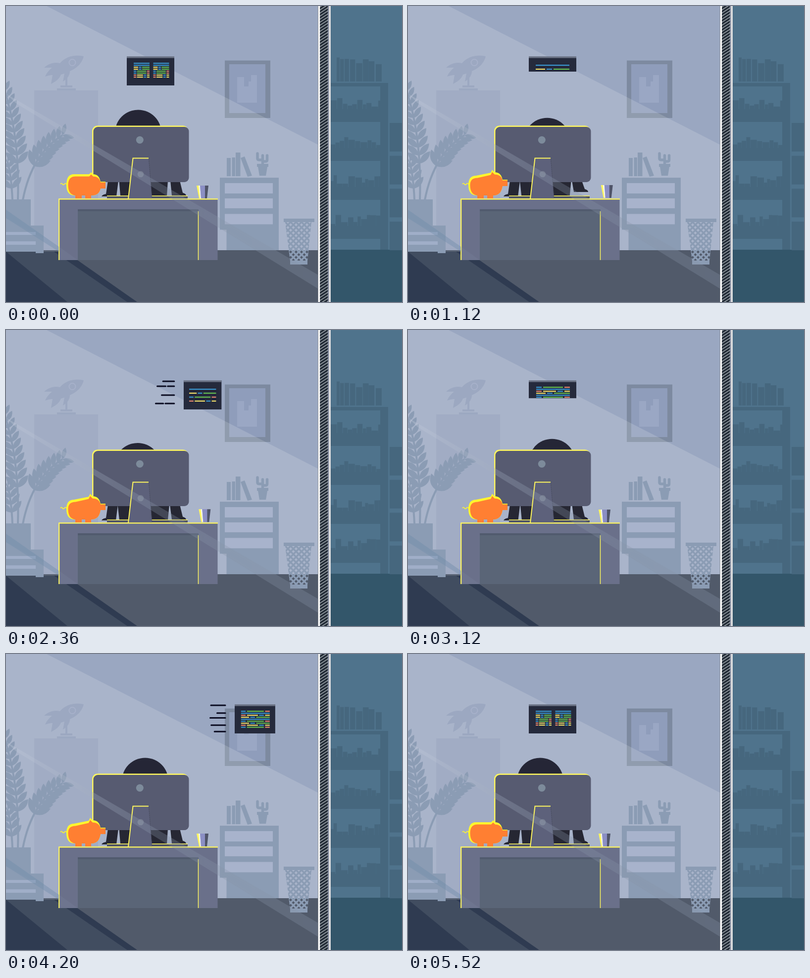
These frames come from a looping animation (800 px wide and 600 px high, 5560 ms). An HTML page:

```html
<!DOCTYPE html>
<html lang="en">
<head>
<meta charset="utf-8">
<title>Office loop</title>
<style>
html, body { margin: 0; width: 100%; height: 100%; overflow: hidden; }
svg { display: block; width: 100vw; height: 100vh; }
</style>
</head>
<body>
<svg viewBox="0 0 800 600">
<defs>
  <pattern id="rope" width="6.2" height="6.2" patternUnits="userSpaceOnUse" patternTransform="translate(634 0) skewY(-33)">
    <path d="M0 2H7" stroke="#b3bbc0" stroke-width="1.6"/>
  </pattern>
  <pattern id="mesh" width="11" height="11" patternUnits="userSpaceOnUse" x="564" y="438">
    <path d="M-2 -2L13 13M13 -2L-2 13" stroke="#8b9cb4" stroke-width="3.6"/>
  </pattern>
  <linearGradient id="ray">
    <stop stop-color="#c6cede"/><stop offset=".5" stop-color="#8693a7"/>
  </linearGradient>
  <clipPath id="reveal"><rect id="revealBox" y="102" width="96" height="59"/></clipPath>
</defs>

<!-- left room: wall, picture, daylight -->
<path fill="#9aa7c1" d="M0 0H632V600H0z"/>
<path fill="#7d8aa0" d="M442 110.500h92v116.500h-92z"/>
<path fill="#8f9dbb" d="M451 118h73v99h-73z"/>
<path fill="#9aa7c4" d="M467 144h14v19h9v-10h5v-13h12v56h-40z"/>
<path fill="#fff" opacity=".15" d="M0 0H82L632 282V600H0z"/>

<!-- cabinet and rocket -->
<path fill="#a1acc4" d="M57 171h129v324H57z"/>
<g fill="#9ca8c1">
  <path d="M103 167h38v4h-38zM110 161h24v4h-24zM120 136h4v25h-4z"/>
  <path d="M157 102C139 98 121 102 109 116C97 113 86 117 77 125L93 125C86 131 82 136 79 143C85 141 89 140 94 140L91 158C101 153 108 147 111 139L118 137L115 153C124 148 129 140 129 132C144 126 154 115 157 102z"/>
</g>
<circle cx="134" cy="114.500" r="6.500" fill="none" stroke="#a7b1ca" stroke-width="2"/>

<!-- floor -->
<path fill="#515a6a" d="M0 495H632V600H0z"/>
<path fill="#2f3b51" d="M0 498H120L265 600H0z"/>
<path fill="#414d60" d="M0 498H97L245 600H124z"/>

<!-- plant and low shelf -->
<g id="plant" fill="#8b9cb4" stroke="#8b9cb4"></g>
<path fill="#8b9cb4" d="M0 392h50v53h26v56H60v-3H0z"/>
<path fill="#a3b0ca" d="M0 458h60v6H0zM0 477h60v7H0z"/>

<!-- drawers, books, cactus, bin -->
<g fill="#8b9cb4">
  <path d="M432 348h119v147H445.500v-41.500H432z"/>
  <path d="M446 308h8v37h-8zM456.500 307h6.500v38h-6.500zM464 297h9.500v48H464zM474 308l8-3L497 344l-9 2z"/>
  <path d="M507 320h23v6h-2l-3 18h-13l-3-18h-2z"/>
  <path fill="none" stroke="#8b9cb4" stroke-width="5.500" stroke-linecap="round" d="M518.500 303V322M508 299V309Q508 312 512 312H517M527.500 303V312Q527.500 315 524 315H519"/>
  <path d="M561 431h62v7h-62zM574 516h35v8h-35z"/>
</g>
<path fill="#a8b3cc" d="M442 359h97v21h-97zM442 390h97v20h-97zM442 421.500h97v21h-97z"/>
<path fill="url(#mesh)" d="M564 438H617L609 517H574z"/>

<!-- person -->
<circle id="head" r="47" fill="#252636"/>
<path id="body" fill="#262733"/>

<!-- keyboard and monitor -->
<path fill="#4f5468" d="M204 385h163v5H204z"/>
<path stroke="#fff75e" stroke-width="1.500" d="M204 385H367"/>
<rect x="174" y="242.500" width="194" height="113" rx="11" fill="#fff75e"/>
<rect x="176.500" y="245" width="193" height="112" rx="9" fill="#575b71"/>
<circle cx="270.300" cy="271.500" r="7.500" fill="#7d8b9b"/>
<path fill="#5d617b" d="M256 308.500H288L295 391H247z"/>
<path fill="none" stroke="#fff75e" stroke-width="2" d="M247 391L256.500 308.500H288"/>
<path stroke="#4a4e62" stroke-dasharray="3 1" d="M288.500 310L295 389"/>
<circle cx="272" cy="341" r="6.300" fill="#787f92"/>

<!-- desk -->
<path fill="#6a708a" d="M107 391H427.500V515H107z"/>
<path fill="#5a6577" d="M145 413H389V515H145z"/>
<path fill="#515b6e" d="M145 412H389V416H145z"/>
<path fill="none" stroke="#fff75e" stroke-width="2.200" d="M107.200 515V391.300H428"/>
<path stroke="#fff75e" stroke-width="1.500" d="M388.500 416V515"/>

<g id="cup">
  <path fill="#fff75e" d="M385 364h5l3 26h-3z"/>
  <path fill="#f4f5ee" d="M389 364h3l2 26h-2z"/>
  <path fill="#8b8fc4" d="M392 364h10v26h-8z"/>
  <path fill="#4f5468" d="M402 364h7l-3 26h-4z"/>
</g>

<!-- piggy bank -->
<path fill="none" stroke="#fff52e" stroke-width="1.600" d="M110 361q2-3 4 0t4 0t4 0h3"/>
<path id="pigRim" fill="#fff52e"/>
<path id="pig" fill="#ff7f32"/>
<path fill="#ff7f32" d="M140 378h13v12h-13zM160 378h12v12h-12z"/>

<!-- light beams -->
<path fill="url(#ray)" opacity=".3" d="M0 178L632 546V574L20 197z"/>
<path fill="#6d8aa8" opacity=".4" d="M0 413L107 488V498L0 430z"/>
<path fill="#8b9cb4" opacity=".12" d="M0 430L107 488L145 515H107V498H0z"/>

<!-- right room -->
<path fill="#4f738c" d="M655 0H800V495H655z"/>
<path fill="#33566a" d="M655 494H800V600H655z"/>
<g id="library" fill="#46677e"></g>

<g id="speed" stroke="#0a0b20" stroke-width="3" stroke-linecap="round"></g>
<g id="panel">
  <g clip-path="url(#reveal)">
    <path fill="#252a3c" d="M0 102H96V161H0z"/>
    <g id="code0"></g><g id="code1"></g><g id="code2"></g>
  </g>
  <path fill="#6d7587" d="M0 102H96V105.500H0z"/>
</g>

<!-- divider -->
<path fill="#222b36" d="M630 0H656V600H630z"/>
<path fill="url(#rope)" d="M634 0H652V600H634z"/>
<path fill="#fff" d="M630.500 0h3.700V600h-3.700zM652.700 0h3V600h-3z"/>
<path fill="#b9bfd6" d="M650.500 0h1.500V600h-1.500z"/>
</svg>

<script>
const LOOP = 5560, STEP = 40, HOME = 244;
const SLIDES = [360, 2280, 4080, Infinity];
const $ = id => document.getElementById(id);
const add = (id, markup) => $(id).insertAdjacentHTML('beforeend', markup);
const show = (id, on) => $(id).style.display = on ? '' : 'none';
const rect = (x, y, w, h, fill = '') =>
  `<rect x="${x}" y="${y}" width="${w}" height="${h}" ${fill && `fill="${fill}"`}/>`;
const clamp = u => Math.min(1, Math.max(0, u));
const ramp = (t, from, to) => clamp((t - from) / (to - from));
const ease = (t, from, to) => { const u = ramp(t, from, to); return u * u * (3 - 2 * u); };

let seed = 7;
const random = (lo, hi) => {
  seed = seed * 16807 % 2147483647;
  return lo + (hi - lo) * seed / 2147483647;
};

// A frond: a curved stem with leaf pairs that shrink toward the tip
function frond(x0, y0, cx, cy, x1, y1, pairs, from, size) {
  let out = `<path d="M${x0} ${y0}Q${cx} ${cy} ${x1} ${y1}" fill="none" stroke-width="4"/>`;
  for (let i = 0; i <= pairs; i++) {
    const u = from + (1 - from) * i / pairs, v = 1 - u;
    const x = v * v * x0 + 2 * u * v * cx + u * u * x1;
    const y = v * v * y0 + 2 * u * v * cy + u * u * y1;
    const dir = Math.atan2(v * (cy - y0) + u * (y1 - cy), v * (cx - x0) + u * (x1 - cx)) * 180 / Math.PI;
    const len = size * (1 - .3 * i / pairs), w = len * .38;
    for (const side of [-44, 44])
      out += `<path stroke="none" transform="translate(${x} ${y})rotate(${dir + side})" d="M0 0Q${len / 2} ${-w} ${len} 0Q${len / 2} ${w} 0 0"/>`;
  }
  return out;
}
add('plant', frond(24, 393, 28, 265, -3, 172, 10, .3, 33)
  + frond(34, 393, 52, 300, 114, 262, 7, .42, 35)
  + frond(13, 393, 11, 345, 3, 315, 4, .25, 31));

// Bookcases: a run of random books standing on each shelf
function books(x, end, base, low, high, gap) {
  let out = '';
  while (x < end - 4) {
    const w = Math.min(random(6, 14), end - x), h = random(low, high);
    out += rect(x, base - h, w, h);
    x += w + random(0, gap);
  }
  return out;
}
add('library', books(668, 759, 153, 33, 50, 3) + rect(655, 156, 117, 7) + rect(756, 156, 16, 338));
for (let i = 0; i < 4; i++) {
  const floor = 209 + i * 79;
  add('library', rect(655, floor, 102, 26) + books(655, 757, floor, 4, 24, 1)
    + rect(775, 237 + i * 66.7, 25, 58));
}

// Code lines: ink letter and width of each run, on a 68 px line
const INK = { b: '#3a9ad4', y: '#fbe66c', g: '#68c452', o: '#f08a72' };
const LINE = { b: 'b68', m: 'y19 b11 g32', n: 'b11 g40 o11', p: 'o11 y26 b11 y11' };
function code(id, rows, pitch, starts, scale) {
  for (const start of starts) [...rows].forEach((row, i) => {
    let x = start;
    for (const run of LINE[row].split(' ')) {
      const w = run.slice(1) * scale;
      add(id, rect(x, 115 + i * pitch, w, 2.1, INK[run[0]]));
      x += w + 3 * scale;
    }
  });
}
code('code0', 'bbmmnnpp', 4, [14, 53.5], .47);
code('code1', ' bmnp'.trim(), 8, [14], 1);
$('code1').setAttribute('transform', 'translate(0 4)');
code('code2', 'nbpmbnmpn', 4.05, [15], 1);

// Speed lines trailing the panel, some broken in two
for (let i = 0; i < 3; i++) {
  let d = '';
  for (let y = 104; y < 158; y += random(8, 18)) {
    const far = random(-62, -34), cut = random(-46, -32);
    d += far < -50 ? `M${far} ${y}H${cut - 4}M${cut} ${y}H-19` : `M${far} ${y}H-19`;
  }
  add('speed', `<path id="streak${i}" d="${d}"/>`);
}

// Accelerate, then run at constant speed
const slide = u => u <= 0 ? 0 : u < 72 ? .0179 * u * u : 2.58 * (u - 35.5);

function drawPanel(t) {
  const cycle = SLIDES.filter(s => t >= s + 280).length;
  const u = t - SLIDES[cycle];
  const born = cycle ? SLIDES[cycle - 1] + 340 : -LOOP;
  const x = HOME + slide(u);
  const squash = 1 - .2 * ramp(u, 0, 80) + .053 * ramp(u, 80, 120);
  $('panel').setAttribute('transform', `translate(${x} 0)scale(${squash} 1)`);
  $('revealBox').setAttribute('height', 3 + 56 * ramp(t, born, born + 840));
  $('speed').setAttribute('transform', `translate(${x} 0)`);
  show('panel', t >= born);
  for (let i = 0; i < 3; i++) {
    show('code' + i, i === cycle % 3);
    show('streak' + i, i === cycle && u > 30);
  }
}

function drawPerson(t) {
  const slump = ease(t, 560, 1280) - ease(t, 2360, 4000);
  const sway = 16 * ease(t, 0, 800) - 17 * ease(t, 800, 2360) + 25 * ease(t, 2360, 3120) - 24 * ease(t, 3120, LOOP);
  $('head').setAttribute('cx', 267 + sway);
  $('head').setAttribute('cy', 257.5 + 18.5 * slump);

  const busy = t > 4000 && t < 4360 ? 0 : Math.min(ramp(t, 0, 1200), 1 - ramp(t, 5200, 5400));
  const tap = (from, size) => size * busy * Math.max(0, Math.sin(2 * Math.PI * (t - from) / 160));
  const left = 386 - tap(0, 5), right = 384.5 - tap(1080, 8), gap = 3 * slump;
  $('body').setAttribute('d',
    `M206 354H${227 - slump}L${223 - slump} ${left}H193Q195 ${left - 4} 202 ${left - 5}z`
    + `M${228.5 - gap} 354H${327 + gap}L${325 + 2 * slump} 385H${231 - 2 * slump}z`
    + `M${332 - slump} 354H351L357 ${right - 6}Q364 ${right - 4} 364 ${right}H335z`);
}

// Outline of the piggy bank: q lifts the snout, inset leaves the lit rim
function pigPath(q, inset) {
  const l = 122 + inset, a = 341 + 3 * q + inset * 1.3, b = 341 - 4 * q + inset * 1.3;
  const s = 356 - 4 * q + inset * .4, e = 337 - 5 * q + inset * 1.3;
  return `M${l} 363Q${l} ${a} ${l + 15} ${a}L${168 - q} ${b + q}L${172 - 2 * q} ${e}L${176 - q} ${b}`
    + `Q188 ${b} 191 ${s}H201V${370 - 5 * q}H191Q188 384 173 384H${l + 17}Q${l} 384 ${l} 363z`;
}

function frame(now) {
  const t = Math.floor(now % LOOP / STEP) * STEP;
  drawPanel(t);
  drawPerson(t);
  const nudge = 9 * (ease(t, 600, 1600) - ease(t, 1900, 2800));
  $('cup').setAttribute('transform', `translate(${nudge} ${-nudge / 5})`);
  const lift = ease(t, 640, 1100) - ease(t, 4440, 4960);
  $('pigRim').setAttribute('d', pigPath(lift, 0));
  $('pig').setAttribute('d', pigPath(lift, 3.5));
}

let start;
function tick(now) {
  start ??= now;
  frame(now - start);
  requestAnimationFrame(tick);
}
frame(0);
requestAnimationFrame(tick);
</script>
</body>
</html>
```
